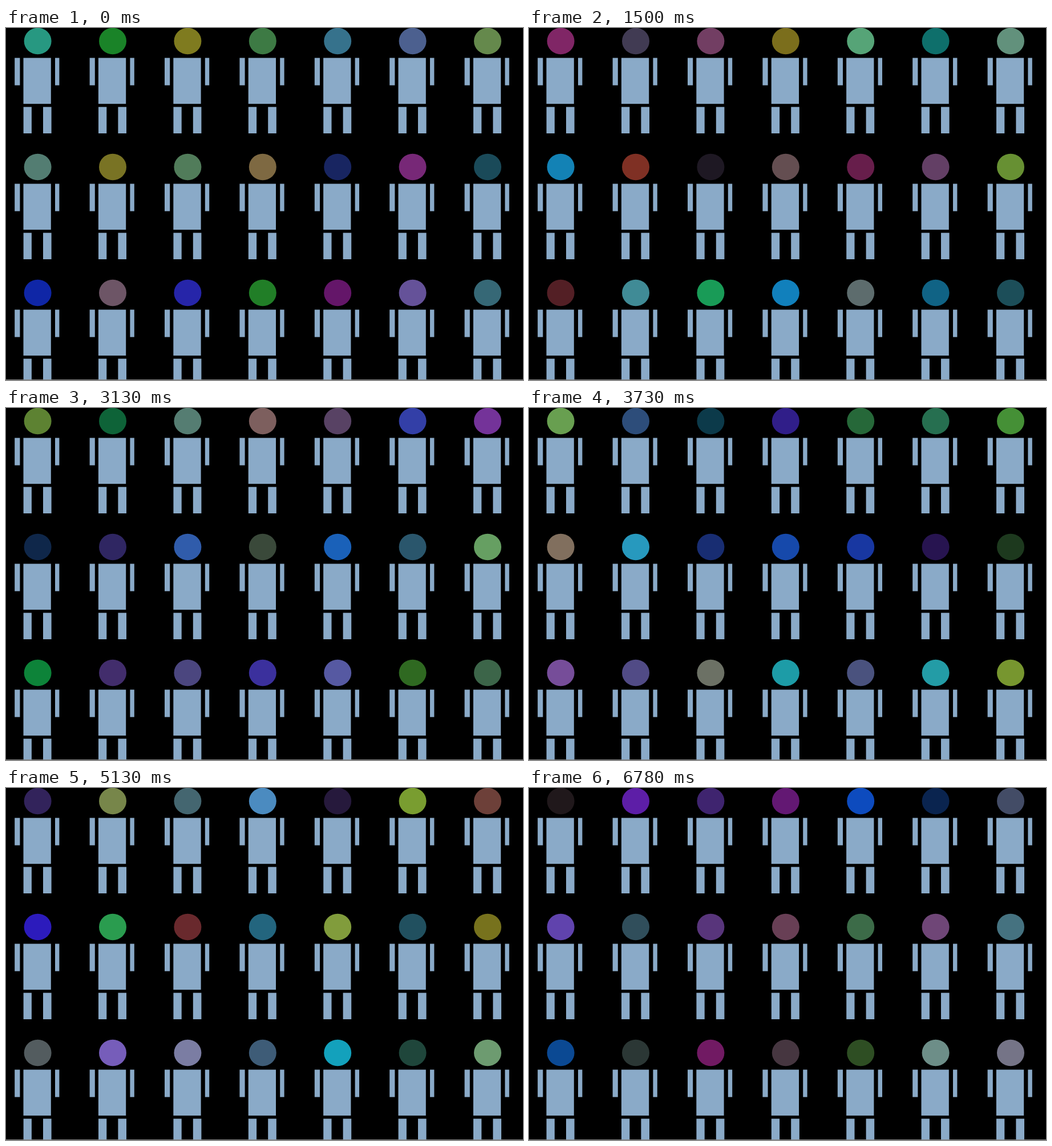
These frames come from a looping animation (906 px wide and 618 px high, 6880 ms). An HTML page:

```html
<!DOCTYPE html>
<html lang="en">
<head>
<meta charset="utf-8">
<title>Color-changing heads</title>
<style>
  html, body { margin: 0; width: 100%; height: 100%; overflow: hidden; background: #808080; }
  svg { display: block; width: 906px; height: 618px; }
</style>
</head>
<body>
<svg id="stage" viewBox="0 0 906 618"></svg>
<script>
const LOOP = 6880, COLS = 7, ROWS = 3, COL_STEP = 131.4, ROW_STEP = 221;
const FLOOR = 617, SKIN = '#8aaac8';

// Body parts of one figure: left, top, right, bottom
const PARTS = {
  leftArm: [15.2, 52.5, 24.4, 100.6],
  torso: [30.5, 52.5, 78.8, 133.2],
  rightArm: [86, 52.5, 93.4, 100.6],
  leftLeg: [30.6, 138.6, 44.9, 185],
  rightLeg: [65, 138.6, 79.6, 185]
};

// Runs of evenly spaced color changes: first ms, last ms, count
const RUNS = [
  [50, 1030, 7], [1210, 2230, 8], [2380, 3290, 7],
  [3440, 4390, 7], [4540, 5580, 8], [5720, 6600, 7]
];
const times = [
  0,
  ...RUNS.flatMap(([first, last, count]) =>
    Array.from({ length: count }, (_, i) => first + (last - first) * i / (count - 1))),
  6780
];

const stage = document.getElementById('stage');

function add(tag, attrs) {
  const el = document.createElementNS(stage.namespaceURI, tag);
  for (const key in attrs) el.setAttribute(key, attrs[key]);
  return stage.appendChild(el);
}

let seed = 7;
function random(min, max) {
  seed = (seed * 1664525 + 1013904223) % 4294967296;
  return Math.round(min + (max - min) * seed / 4294967296);
}

// Muted colors that lean towards blue
const headColor = () => `rgb(${random(10, 130)}, ${random(20, 165)}, ${random(25, 195)})`;

function addFigure(dx, dy) {
  for (const [left, top, right, bottom] of Object.values(PARTS)) {
    add('rect', {
      x: left + dx,
      y: top + dy,
      width: right - left,
      height: Math.min(bottom + dy, FLOOR) - top - dy,
      fill: SKIN
    });
  }
  const head = add('ellipse', { cx: 55.6 + dx, cy: 23 + dy, rx: 24, ry: 23.2 });
  const frames = times.map(ms => ({
    offset: ms / LOOP, fill: headColor(), easing: 'steps(1, end)'
  }));
  frames.push({ offset: 1, fill: frames[0].fill });
  head.animate(frames, { duration: LOOP, iterations: Infinity });
}

add('rect', { width: 906, height: FLOOR });
for (let row = 0; row < ROWS; row++) {
  for (let col = 0; col < COLS; col++) addFigure(col * COL_STEP, row * ROW_STEP);
}
</script>
</body>
</html>
```
